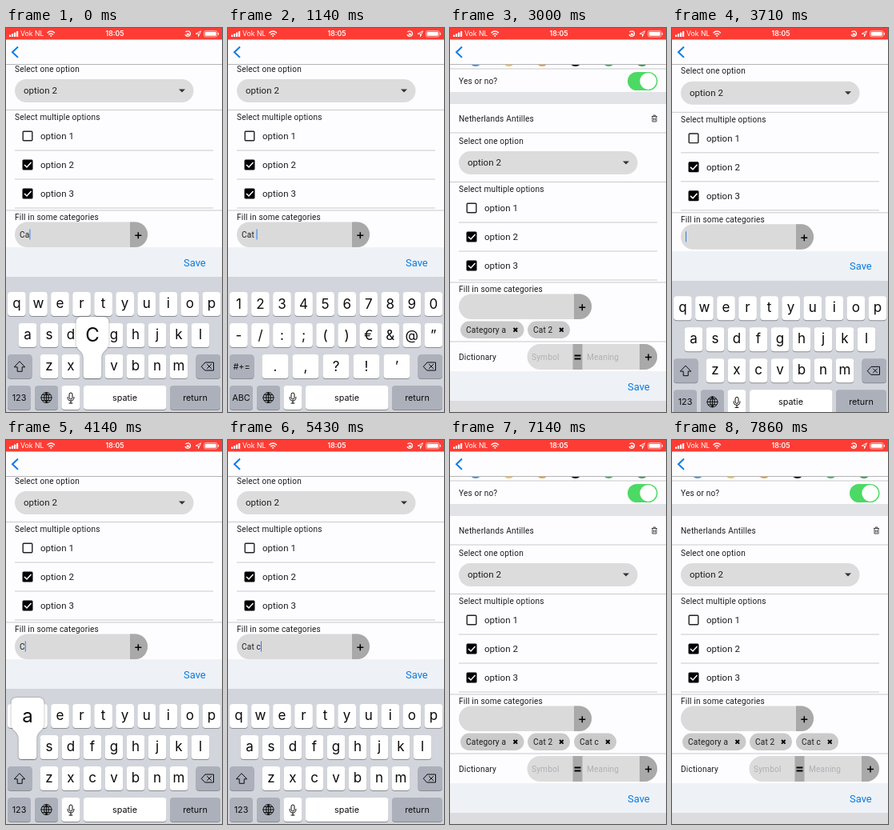
Write an HTML page that moves like this. It is 270 px wide and 480 px high and loops after 8000 ms.

```html
<!DOCTYPE html>
<html lang="en">
<head>
<meta charset="utf-8">
<title>Category form</title>
<style>
html, body { margin: 0; height: 100%; overflow: hidden; background: #fdfdff; }
svg { display: block; width: 100vw; height: 100vh; }
text { font: 10.08px Roboto, sans-serif; letter-spacing: .18px; fill: #1c1c1e; white-space: pre; }
.opt { font-size: 11.52px; letter-spacing: 0; }
.hint { fill: #b0b0b4; }
.save { font-size: 12.96px; letter-spacing: 0; fill: #0a7be0; }
.status text { font: 8.7px Inter, sans-serif; letter-spacing: 0; fill: #fff; }
.kb text { font: 17px Inter, sans-serif; letter-spacing: 0; text-anchor: middle; fill: #0b0b0c; }
.kb .small { font-size: 10.8px; }
.kb .big { font-size: 24px; }
.icon { fill: none; stroke: #0b0b0c; stroke-width: 1; stroke-linejoin: round; stroke-linecap: round; }
#popup { filter: drop-shadow(0 .5px 1px #0006); }
</style>
</head>
<body>
<script>
const FPS = 7, LOOP = 8000;

const rect = (x, y, w, h, fill, r = 0, attrs = '') =>
  `<rect x="${x}" y="${y}" width="${w}" height="${h}" rx="${r}" fill="${fill}" ${attrs}/>`;
const text = (x, y, s, cls = '', attrs = '') => `<text x="${x}" y="${y}" class="${cls}" ${attrs}>${s}</text>`;
const path = (d, attrs = 'class="icon"') => `<path d="${d}" ${attrs}/>`;
const line = (y, x = 0, w = 270) => rect(x, y, w, 1, '#c9c9cd');
const plus = (x, y) => path(`M${x - 4} ${y}h8M${x} ${y - 4}v8`, 'stroke="#000" stroke-width="1.5"');

// Form
const checkbox = (y, label, on) =>
  (on ? rect(20.5, y - 6.5, 13, 13, '#000', 1.5) + path(`M23 ${y}l3 3 5.500-6`, 'fill="none" stroke="#fff" stroke-width="1.5"')
      : rect(21.2, y - 5.8, 11.6, 11.6, 'none', 1, 'stroke="#222" stroke-width="1.4"')) +
  text(43, y + 4, label, 'opt') + line(y + 17.5, 11, 248);

const chip = (x, w, label) => `<g class="chip">${rect(x, 366.5, w, 21.5, '#cacaca', 10.75)}${text(x + 7, 380.7, label)}${
  path(`M${x + w - 13} 375l4.600 4.600m0-4.600l-4.600 4.600`, 'stroke="#000" stroke-width="1.9"')}</g>`;

const dots = ['#2f9bf0', '#ffc21a', '#ff9d0a', '#111', '#2fc04f', '#22ab3f']
  .map((c, i) => `<circle cx="${32 + 41.6 * i}" cy="40" r="8" fill="${c}"/>`).join('');

const form = dots + line(50.5) + text(11, 69.6, 'Yes or no?') +
  rect(222, 55, 37.500, 23, '#4cd964', 11.5) + '<circle cx="247.700" cy="66.500" r="10.400" fill="#fff"/>' +
  rect(0, 80, 270, 15, '#e2e3e7') +
  text(11, 116.6, 'Netherlands Antilles') +
  path('M252 110.500h7M254.300 110v-1h2.400v1M253 111v6h5v-6M254.700 112.500v3M256.300 112.500v3', 'fill="none" stroke="#333" stroke-width=".9"') +
  line(130.500) + text(11, 144.6, 'Select one option') +
  rect(11, 154, 223.500, 29, '#dcdcdd', 14.5) + text(22, 172, 'option 2', 'opt') +
  path('M216 166.500h8l-4 4z', 'fill="#333"') +
  line(192) + text(11, 204.8, 'Select multiple options') +
  checkbox(225, 'option 1', false) + checkbox(261, 'option 2', true) + checkbox(297, 'option 3', true) +
  line(317.500) + text(11, 329.8, 'Fill in some categories') +
  rect(11, 332.5, 166, 31.5, '#dadadb', 15.7) +
  `<g id="add">${path('M155 332.500h6.300a15.700 15.700 0 0 1 0 31.500h-6.300z', 'fill="#a9a9a9"')}${plus(165.3, 349.3)}</g>` +
  text(17, 351.8, '', '', 'id="entry"') + rect(0, 341.5, 1, 13, '#2f7de8', 0, 'id="caret"') +
  chip(13, 79.5, 'Category a') + chip(97, 53, 'Cat 2') + chip(155, 53, 'Cat c') +
  line(391.500) + text(11, 414.6, 'Dictionary') +
  rect(96.5, 395, 162.500, 32, '#dcdcdd', 16) + rect(153.5, 395, 12, 32, '#a9a9a9') +
  path('M237 395h6a16 16 0 0 1 0 32h-6z', 'fill="#a9a9a9"') + plus(248, 411.5) +
  text(102, 414.6, 'Symbol', 'hint') + text(171, 414.6, 'Meaning', 'hint') +
  path('M155.500 409.500h8M155.500 413.500h8', 'stroke="#000" stroke-width="1.8"');

// Keyboard, drawn at its open position
const GREY = '#abb0ba', spots = {};
const key = (x, y, w, fill = '#fff', attrs = '') => rect(x, y + 1, w, 30, '#898c92', 4) + rect(x, y, w, 30, fill, 4, attrs);
const row = (chars, first, top, step = 27, w = 22.7, drop = 21) => [...chars].map((c, i) => {
  const cx = first + step * i;
  spots[c] = [cx, top];
  return key(cx - w / 2, top, w) + text(cx, top + drop, c.replace('&', '&amp;'));
}).join('');

const letters = row('qwertyuiop', 13.4, 330, 27.05, 22.7, 20) + row('asdfghjkl', 27, 369, 27, 22.7, 20) +
  row('zxcvbnm', 54, 408, 27, 22.7, 20) + key(2, 408, 30.5, GREY) +
  path('M17.200 417l6.500 6.800h-3.500v5.500h-6v-5.500h-3.500z') + text(16.500, 466, '123', 'small');
const numbers = row('1234567890', 13.4, 330, 27.05) + row('-/:;()€&@”', 13.4, 369, 27.05) +
  row('.,?!’', 59, 408, 38, 33) + key(2, 408, 30.5, GREY) + text(17, 427, '#+=', 'small') + text(16.500, 466, 'ABC', 'small');

const keyboard = rect(0, 311, 270, 170, '#d2d5db') + key(2, 447, 29, GREY) + key(36, 447, 29, GREY) +
  key(69.5, 447, 23, '#fff') + key(97, 447, 103.500, '#fff', 'id="space"') + key(205, 447, 63, GREY) + key(237.5, 408, 30.5, GREY) +
  path('M244.500 423l4.500-5h10.500v10h-10.500zM251.500 420.500l5 5m0-5l-5 5') +
  path('M50.500 455.500a6.500 6.500 0 1 0 .010 0M50.500 455.500v13M44 462h13M45.500 458.500h10M45.500 465.500h10M50.500 455.500q-6 6.500 0 13q6-6.500 0-13') +
  path('M79 458a2 2 0 0 1 4 0v4a2 2 0 0 1-4 0zM77 461.500q0 4.500 4 4.500t4-4.500M81 466v3M79 469h4') +
  text(148.500, 465.5, 'spatie', 'small') + text(236.500, 465.5, 'return', 'small') +
  `<g id="letters">${letters}</g><g id="numbers">${numbers}</g>` +
  `<g id="popup">${path('M-11.300 26V4C-11.300-5-20.500-5-20.500-14V-40q0-7 7-7h27q7 0 7 7V-14C20.500-5 11.300-5 11.300 4V26q0 4-4 4H-7.300q-4 0-4-4z', 'fill="#fff"')}${
    text(0, -16, '', 'big', 'id="popText"')}</g>`;

// Status bar and header
const bars = [0, 1, 2, 3].map(i => rect(4 + 3 * i, 8.5 - 1.5 * i, 2.2, 2.5 + 1.5 * i, '#fff', .5)).join('');
const white = 'fill="none" stroke="#fff" stroke-width="1.300"';
const header = rect(0, 0, 270, 45, '#fdfdff') + rect(0, 45, 270, 1, '#b4b4b8') + rect(0, 0, 270, 14.5, '#fd3d35') +
  path('M15 23.500l-7 6.700 7 6.700', 'fill="none" stroke="#0a7be8" stroke-width="2"') +
  `<g class="status">${bars}${text(18, 10.2, 'Vok NL')}${text(136, 10.2, '18:05', '', 'text-anchor="middle" style="font-weight:600"')}` +
  path('M51.500 6.200q4.700-4.400 9.400 0M53.300 8.300q2.900-2.700 5.800 0', white) + path('M54.800 9.500q1.400-1.200 2.800 0l-1.400 1.700z', 'fill="#fff"') +
  path('M224.500 5.200a3.300 3.300 0 1 1-.500 2.800', white + ' stroke-width="1"') + rect(225.8, 6.5, 3, 2.4, '#fff', .4) +
  path('M237 7.300l6.500-3.500-3 7v-3.500z', 'fill="none" stroke="#fff" stroke-width=".9"') +
  rect(247.5, 3.5, 16.500, 7.5, 'none', 2, 'stroke="#fff" stroke-width=".8" stroke-opacity=".7"') +
  rect(248.7, 4.7, 14, 5.1, '#fff', 1) + rect(264.8, 5.8, 1.1, 2.9, '#fff', .5) + '</g>';

document.body.innerHTML = `<svg viewBox="0 0 270 480" preserveAspectRatio="none">
  ${rect(0, 0, 270, 480, '#fdfdff')}<g id="form">${form}</g>
  <g id="footer">${rect(0, 429, 270, 37, '#eef2f6')}${rect(0, 466, 270, 200, '#dcdcde')}${text(222, 452.5, 'Save', 'save')}</g>
  <g id="kb" class="kb">${keyboard}</g>${header}</svg>`;

// Timelines: [tick, value], seven ticks per second
const typed = [[0, 'Ca'], [3, 'Cat'], [5, 'Cat '], [13, 'Cat 2'], [18, ''], [28, 'C'], [30, 'Ca'], [32, 'Cat'], [33, 'Cat '], [37, 'Cat c'], [42, '']];
const pressed = [[0, 'C'], [1, ''], [3, 't'], [4, ''], [5, ' '], [6, ''], [13, '2'], [15, ''], [28, 'C'], [29, 'a'],
  [31, ''], [32, 't'], [33, ' '], [34, ''], [37, 'c'], [38, '']];
const at = (list, n) => list.filter(([start]) => start <= n).pop()[1];
const easeOut = (t, start, span) => 1 - (1 - Math.min(1, Math.max(0, (t - start) / span))) ** 3;

const $ = id => document.getElementById(id);
const show = (el, on) => el.setAttribute('visibility', on ? 'visible' : 'hidden');
const move = (id, x, y) => $(id).setAttribute('transform', `translate(${x} ${y})`);
const chips = document.querySelectorAll('.chip');

function draw(n) {
  const t = n * 1000 / FPS;
  const open = 1 - easeOut(t, 2500, 500) + easeOut(t, 3400, 460) - easeOut(t, 5930, 670);
  move('form', 0, -90 * open);
  move('footer', 0, -155 * open);
  move('kb', 0, 169 * (1 - open));

  $('entry').textContent = at(typed, n);
  $('caret').setAttribute('x', 17 + $('entry').getComputedTextLength());
  show($('caret'), n < 18 || n >= 24 && n < 42);
  $('add').setAttribute('opacity', [17, 18, 41, 42].includes(n) ? .2 : 1);
  show(chips[1], n >= 18);
  show(chips[2], n >= 42);

  const numeric = n >= 8 && n < 24;
  show($('letters'), !numeric);
  show($('numbers'), numeric);
  const char = at(pressed, n), spot = spots[char.toLowerCase()];
  $('space').setAttribute('fill', char === ' ' ? GREY : '#fff');
  show($('popup'), spot);
  if (spot) {
    move('popup', ...spot);
    $('popText').textContent = char;
  }
}

const begin = performance.now();
function tick() {
  const t = (performance.now() - begin) % LOOP;
  draw(Math.floor(t * FPS / 1000 + .05) % (LOOP * FPS / 1000));
  requestAnimationFrame(tick);
}
tick();
</script>
</body>
</html>
```
